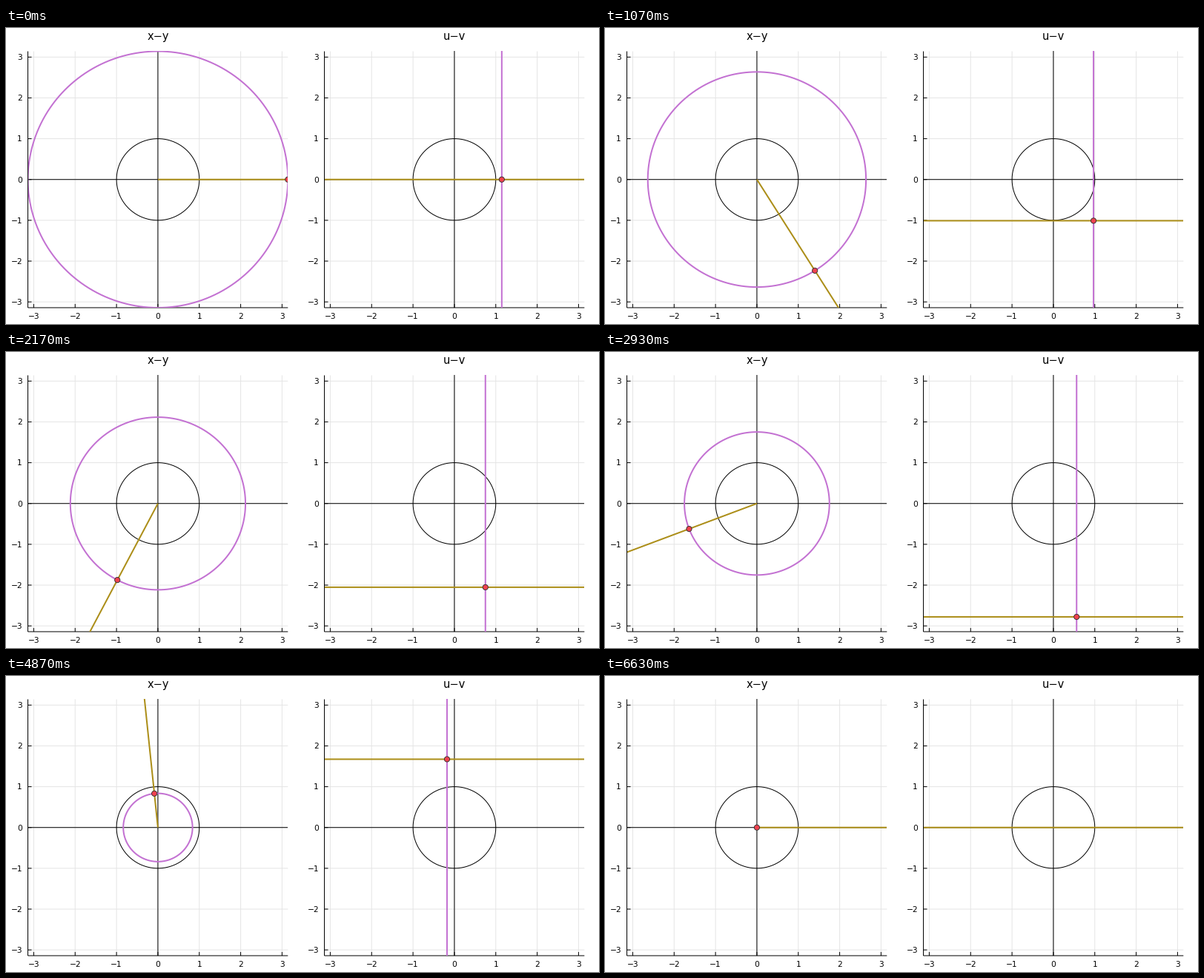
A matplotlib script for the animation above (6660 ms loop, 800 by 400 pixels).

```python
import numpy as np
import matplotlib.pyplot as plt
from matplotlib.animation import FuncAnimation
from matplotlib.patches import Ellipse

W, H, DPI = 800, 400, 100
PX = 72 / DPI
MM = DPI / 25.4
FRAMES, LOOP_MS = 200, 6660

# Margins of each half-width panel.
LEFT, RIGHT = 7.5 * MM, W / 2 - 5 * MM
TOP, BOTTOM = 8 * MM, H - 5.6 * MM
SX, SY = (RIGHT - LEFT) / (2 * np.pi), (BOTTOM - TOP) / (2 * np.pi)

VIOLET, GOLD, RED = "#c371d2", "#ac8e18", "#f0424f"
GRID, EDGE = "#e5e5e5", "#303030"

ring = np.linspace(0, 2 * np.pi, 181)
COS, SIN = np.cos(ring), np.sin(ring)

plt.rcParams["font.family"] = "DejaVu Sans"
plt.rcParams["lines.solid_capstyle"] = "butt"

fig = plt.figure(figsize=(W / DPI, H / DPI), dpi=DPI, facecolor="white")
stage = fig.add_axes([0, 0, 1, 1])
stage.set(xlim=(0, W), ylim=(H, 0))
stage.set_axis_off()


def line(ax, x, y, color="black", width=1.0):
    return ax.plot(x, y, color=color, lw=width * PX, snap=False)[0]


def write(text, x, base, size, align="center"):
    stage.text(x, base, text.replace("-", "\u2212"), fontsize=size * PX,
               ha=align, va="baseline")


def panel(shift, title):
    left, right = LEFT + shift, RIGHT + shift
    cx, cy = (left + right) / 2, (TOP + BOTTOM) / 2
    ticks = [(str(k), cx + k * SX, cy - k * SY) for k in range(-3, 4)]

    for _, x, y in ticks:
        line(stage, [x, x], [TOP, BOTTOM], GRID)
        line(stage, [left, right], [y, y], GRID)
    line(stage, [left, left], [TOP, BOTTOM])
    line(stage, [left, right], [BOTTOM, BOTTOM])
    for label, x, y in ticks:
        line(stage, [x, x], [BOTTOM, BOTTOM - 5])
        line(stage, [left, left + 5], [y, y])
        write(label, x, 393, 10.6)
        write(label, left - 7.5, y + 3.9, 10.6, "right")
    write(title, cx, 16, 14.6)

    ax = fig.add_axes([left / W, 1 - BOTTOM / H,
                       (right - left) / W, (BOTTOM - TOP) / H])
    ax.set(xlim=(-np.pi, np.pi), ylim=(-np.pi, np.pi))
    ax.set_axis_off()
    line(ax, COS, SIN)
    line(ax, [0, 0], [-4, 4])
    line(ax, [-4, 4], [0, 0])
    radial = line(ax, [], [], VIOLET, 2)
    angular = line(ax, [], [], GOLD, 2)
    dot = Ellipse((0, 0), 7.2 / SX, 7.2 / SY, fc=RED, ec=EDGE,
                  lw=0.9 * PX, zorder=3, snap=False)
    ax.add_patch(dot)
    return radial, angular, dot


circle, ray, dot_xy = panel(0, "x-y")
vline, hline, dot_uv = panel(W / 2, "u-v")


def update(i):
    s = i / (FRAMES - 1)
    r, theta = np.pi * (1 - s), -2 * np.pi * s
    c, d = np.cos(theta), np.sin(theta)
    # Complex logarithm: u = ln r (kept finite), v = principal angle.
    u = np.log(max(r, 1e-3))
    v = (theta + np.pi) % (2 * np.pi) - np.pi

    circle.set_data(r * COS, r * SIN)
    ray.set_data([0, 6 * c], [0, 6 * d])
    dot_xy.set_center((r * c, r * d))
    vline.set_data([u, u], [-4, 4])
    hline.set_data([-4, 4], [v, v])
    dot_uv.set_center((u, v))
    return circle, ray, dot_xy, vline, hline, dot_uv


anim = FuncAnimation(fig, update, frames=FRAMES, interval=LOOP_MS / FRAMES,
                     repeat=True, repeat_delay=0, blit=True)
plt.show()
```
